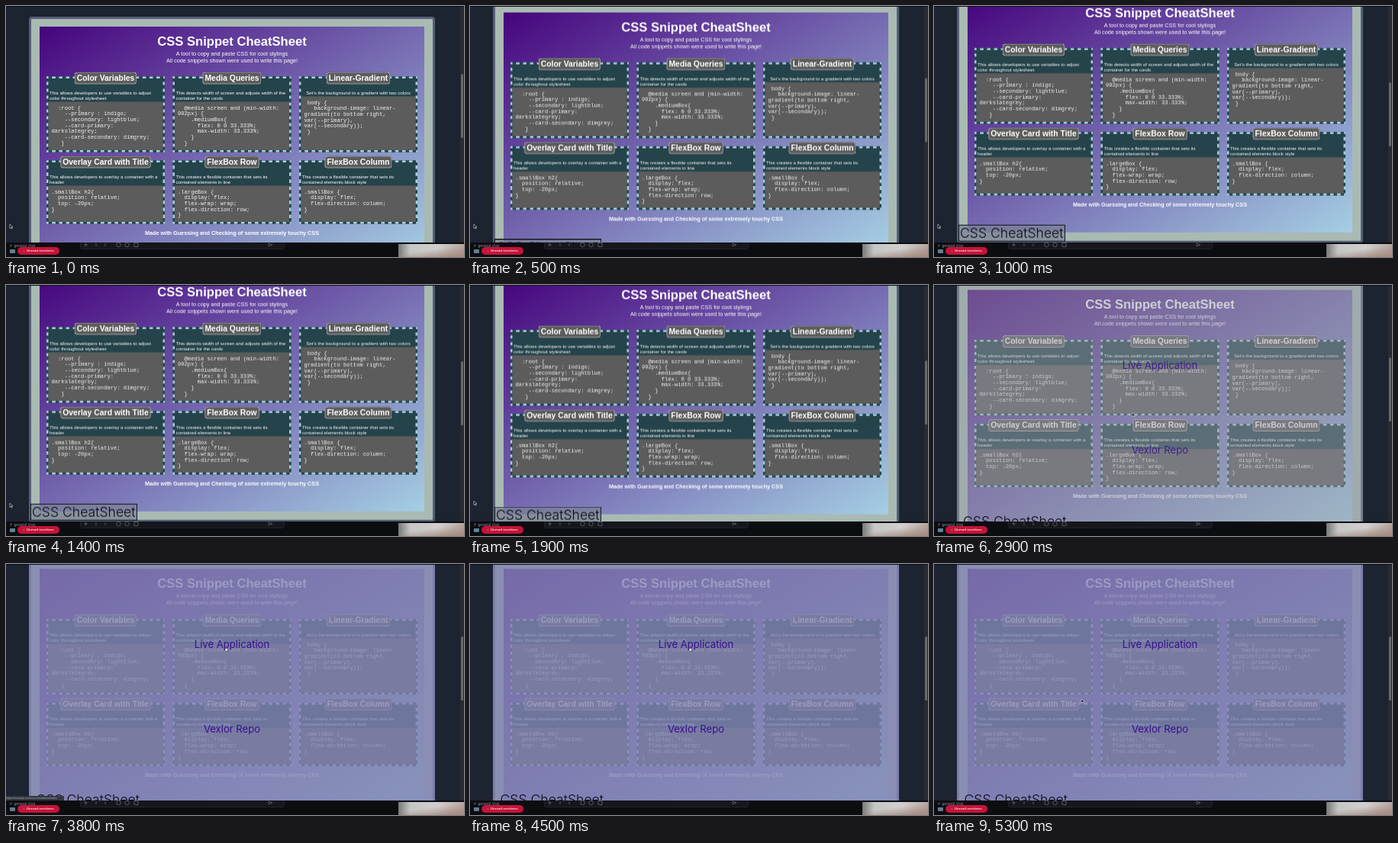
These frames come from a looping animation (600 by 329 pixels, 5.4 s). An HTML page:

```html
<!DOCTYPE html>
<html lang="en">
<head>
<meta charset="utf-8">
<title>CSS CheatSheet</title>
<style>
  :root { --loop: 5400ms linear infinite; --sans: "Liberation Sans", Arial, sans-serif; }
  * { box-sizing: border-box; }
  html, body { margin: 0; width: 100%; height: 100%; overflow: hidden; background: #0c0d11; }
  .stage { position: relative; width: 600px; height: 329px; overflow: hidden; font-kerning: none; }
  .stage div, .stage svg { position: absolute; }

  /* browser page */
  .page { inset: 0 0 19px 0; overflow: hidden; background: #1c2331; border-top: 1px solid #0e1118; }
  .scroll { left: 0; top: -1px; width: 600px; height: 360px; animation: scroll var(--loop); }
  .track { right: 0; top: 0; width: 5px; height: 310px; background: #282b33; }
  .thumb { right: 1px; top: 88px; width: 3px; height: 84px; border-radius: 2px; background: #686a6e; animation: thumb var(--loop); }

  /* drawn at double size, shown at half */
  .frame { left: 30px; top: 14px; width: 1064px; height: 668px; transform: scale(.5); transform-origin: 0 0;
    border: 6px solid #545e75; border-radius: 8px; background: #a9bab3; font-family: var(--sans); color: #fff; }
  .sheet { left: 22px; top: 20px; width: 1008px; height: 614px;
    background: linear-gradient(to bottom right, #46047e, #a5cfe4); }
  .line { left: 0; width: 100%; text-align: center; white-space: pre; transform: translateY(-50%); }
  .title { top: 37.5px; font: bold 33.2px var(--sans); }
  .sub { top: 79px; font: 14.5px/18px var(--sans); }
  .foot { top: 540px; font: bold 14.5px var(--sans); }

  .box { --dash: #a5d0de 25%, #25434a 25% 75%, #a5d0de 75%;
    --across: linear-gradient(90deg, var(--dash)); --down: linear-gradient(var(--dash));
    top: 131px; width: 310px; height: 198px; padding: 35px 5px 5px; display: flex; flex-direction: column;
    background:
      var(--across) 0 0 / 18px 5px round no-repeat, var(--across) 0 100% / 18px 5px round no-repeat,
      var(--down) 0 0 / 5px 18px no-repeat round, var(--down) 100% 0 / 5px 18px no-repeat round, #25434a; }
  .box.low { top: 351px; height: 166px; }
  .name { left: 50%; top: -12px; height: 32px; transform: translateX(-50%); padding: 0 4px; white-space: pre;
    font: bold 20.8px/28px var(--sans); background: #5c5c5c; border: 2px dotted #e4e4e4; border-radius: 7px; }
  .stage .desc, .stage .code { position: static; white-space: pre; }
  .desc { margin: 0 3px 3px; font: 12.4px/14px var(--sans); }
  .code { flex: 1; padding: 9px 0 0 8px; background: #5c5c5c; color: #f4f4f4;
    font: 14.3px/15.3px "Liberation Mono", "Courier New", monospace; }

  /* hover layer */
  .veil { left: 30px; top: 14px; width: 532px; height: 334px; border-radius: 4px; animation: veil var(--loop); }
  .link { left: 30px; width: 532px; text-align: center; transform: translateY(-50%); white-space: pre;
    font: 400 13.1px Inter, sans-serif; color: #390f90; animation: link var(--loop); }
  .label { left: 32px; top: 324px; height: 22px; padding: 0 1px; white-space: pre;
    font: 300 17.6px/20px Inter, sans-serif; color: #0b0b12; border: 1px solid; animation: label var(--loop); }
  .status { left: 0; top: 304px; width: 76px; height: 6px; background: #343840; color: #a9adb5; overflow: hidden;
    font: 3.6px/6px var(--sans); white-space: pre; animation: status var(--loop); }

  /* chat window below */
  .chat { left: 0; top: 310px; width: 600px; height: 19px; background: #0c0d11; overflow: hidden; }
  .room { left: 5px; top: 1px; font: 5px/6px var(--sans); color: #85888f; white-space: pre; }
  .dot { width: 7px; height: 5px; left: 5px; top: 9px; background: #5f8190; border-radius: 1px; }
  .pill { left: 15px; top: 6px; width: 55px; height: 10px; border-radius: 5px; background: #c5143a; color: #f3d5dc;
    font: bold 4.4px/10px var(--sans); text-align: center; white-space: pre; }
  .input { left: 97px; top: -4px; width: 268px; height: 13px; border-radius: 3px; background: #15171c; border: 1px solid #20232a; }
  .photo { left: 514px; top: 2px; width: 86px; height: 17px;
    background: linear-gradient(172deg, #8a7a7600 45%, #a88d84 90%), linear-gradient(90deg, #777879, #c5c6c5 18%, #d0cfcd 60%, #b7a7a1); }

  .cursor { left: 0; top: 0; width: 8px; height: 10px; overflow: visible; animation: cursor var(--loop); }
  .arrow { animation: arrow var(--loop); }
  .hand { animation: hand var(--loop); }

  @keyframes scroll {
    0%, 2% { transform: translateY(0); }
    16.67%, 31.48% { transform: translateY(-37.3px); }
    35.19% { transform: translateY(-33.5px); }
    42.59%, 100% { transform: translateY(-20.6px); }
  }
  @keyframes thumb {
    0%, 2% { transform: translateY(0); }
    16.67%, 31.48% { transform: translateY(11px); }
    35.19% { transform: translateY(10px); }
    42.59%, 100% { transform: translateY(6px); }
  }
  @keyframes veil {
    0%, 47.5% { background: rgba(150,155,165,0); }
    53.7% { background: rgba(150,155,165,.48); }
    61.1%, 100% { background: rgba(130,132,179,.8); }
  }
  @keyframes link {
    0%, 47.5% { opacity: 0; }
    53.7% { opacity: .85; }
    59%, 100% { opacity: 1; }
  }
  @keyframes label {
    0%, 47.5% { background: rgba(125,130,150,.75); border-color: #15161e; transform: none; }
    53.7% { background: rgba(125,130,150,0); border-color: transparent; transform: translate(4px,-4px); }
    59%, 100% { background: rgba(125,130,150,0); border-color: transparent; transform: translate(5.5px,-5px); }
  }
  @keyframes status {
    0%, 68.4% { opacity: 0; }
    68.41%, 81.48% { opacity: 1; }
    81.49%, 100% { opacity: 0; }
  }
  @keyframes hand {
    0%, 66% { opacity: 0; }
    66.01%, 91.5% { opacity: 1; }
    91.51%, 100% { opacity: 0; }
  }
  @keyframes arrow {
    0%, 66% { opacity: 1; }
    66.01%, 91.5% { opacity: 0; }
    91.51%, 100% { opacity: 1; }
  }
  @keyframes cursor {
    0%, 31.48% { transform: translate(5px,286px); }
    35.19%, 46.3% { transform: translate(5px,283px); animation-timing-function: ease-in-out; }
    53.7% { transform: translate(259.5px,167.5px); animation-timing-function: ease-out; }
    66.67%, 90.74% { transform: translate(286px,108px); animation-timing-function: ease-in-out; }
    98.1%, 100% { transform: translate(193px,177px); }
  }
</style>
</head>
<body>
<div class="stage">
  <div class="page">
    <div class="scroll">
      <div class="frame">
        <div class="sheet" id="sheet">
          <div class="line title">CSS Snippet CheatSheet</div>
          <div class="line sub">A tool to copy and paste CSS for cool stylings
All code snippets shown were used to write this page!</div>
          <div class="line foot">Made with Guessing and Checking of some extremely touchy CSS</div>
        </div>
      </div>
      <div class="veil"></div>
      <div class="link" style="top:126px">Live Application</div>
      <div class="link" style="top:237px">Vexlor Repo</div>
      <div class="label">CSS CheatSheet</div>
    </div>
    <div class="track"></div>
    <div class="thumb"></div>
  </div>

  <div class="chat">
    <div class="room">#  general chat</div>
    <div class="dot"></div>
    <div class="input"></div>
    <svg width="370" height="12" fill="none" stroke="#5b5e66" stroke-width=".9">
      <path d="M102 3h5M104.500 .5v5M118 1v4M130 1v4"/>
      <circle cx="147.500" cy="3" r="2.800"/><circle cx="158.500" cy="3" r="2.800"/><rect x="168" y=".5" width="5" height="5"/>
      <path d="M344 1l5 2-5 2z"/>
    </svg>
    <div class="pill">↓  Unread mentions</div>
    <div class="photo"></div>
  </div>
  <div class="status">https://example.com/css-cheatsheet/index</div>

  <svg class="cursor" viewBox="0 0 8 10" stroke="#e8e8e8" stroke-width=".6" fill="#08080c">
    <path class="arrow" d="M0 0v5.200l1.300-1.100.9 2 1-.5-.9-1.900h1.700z"/>
    <path class="hand" fill="#fff" stroke="#16161c" d="M1.200 .5q.8-.5 1 .5v1.500l2 .6q.7.300.5 1.200l-.5 2h-2.600l-1.500-2.300 1.100.3z"/>
  </svg>
</div>

<script>
  const cards = [
    ["Color Variables", "This allows developers to use variables to adjust\ncolor throughout stylesheet",
`  :root {
    --primary : indigo;
    --secondary: lightblue;
    --card-primary:
darkslategrey;
    --card-secondary: dimgrey;
   }`],
    ["Media Queries", "This detects width of screen and adjusts width of the\ncontainer for the cards",
`  @media screen and (min-width:
992px) {
    .mediumBox{
      flex: 0 0 33.333%;
      max-width: 33.333%;
    }
  }`],
    ["Linear-Gradient", "Set's the background to a gradient with two colors",
` body {
   background-image: linear-
gradient(to bottom right,
var(--primary),
var(--secondary));
 }`],
    ["Overlay Card with Title", "This allows developers to overlay a container with a\nheader",
`.smallBox h2{
  position: relative;
  top: -20px;
}`],
    ["FlexBox Row", "This creates a flexible container that sets its\ncontained elements in line",
`.largeBox {
  display: flex;
  flex-wrap: wrap;
  flex-direction: row;
}`],
    ["FlexBox Column", "This creates a flexible container that sets its\ncontained elements block style",
`.smallBox {
  display: flex;
  flex-direction: column;
}`]
  ];

  function add(parent, cls, text = "") {
    const el = document.createElement("div");
    el.className = cls;
    el.textContent = text;
    return parent.appendChild(el);
  }

  const sheet = document.getElementById("sheet");
  cards.forEach(([name, desc, code], i) => {
    const box = add(sheet, i < 3 ? "box" : "box low");
    box.style.left = 18 + (i % 3) * 331 + "px";
    const note = add(box, "desc", desc);
    if (!desc.includes("\n")) note.style.textAlign = "center";
    add(box, "code", code);
    add(box, "name", name);
  });
</script>
</body>
</html>
```
